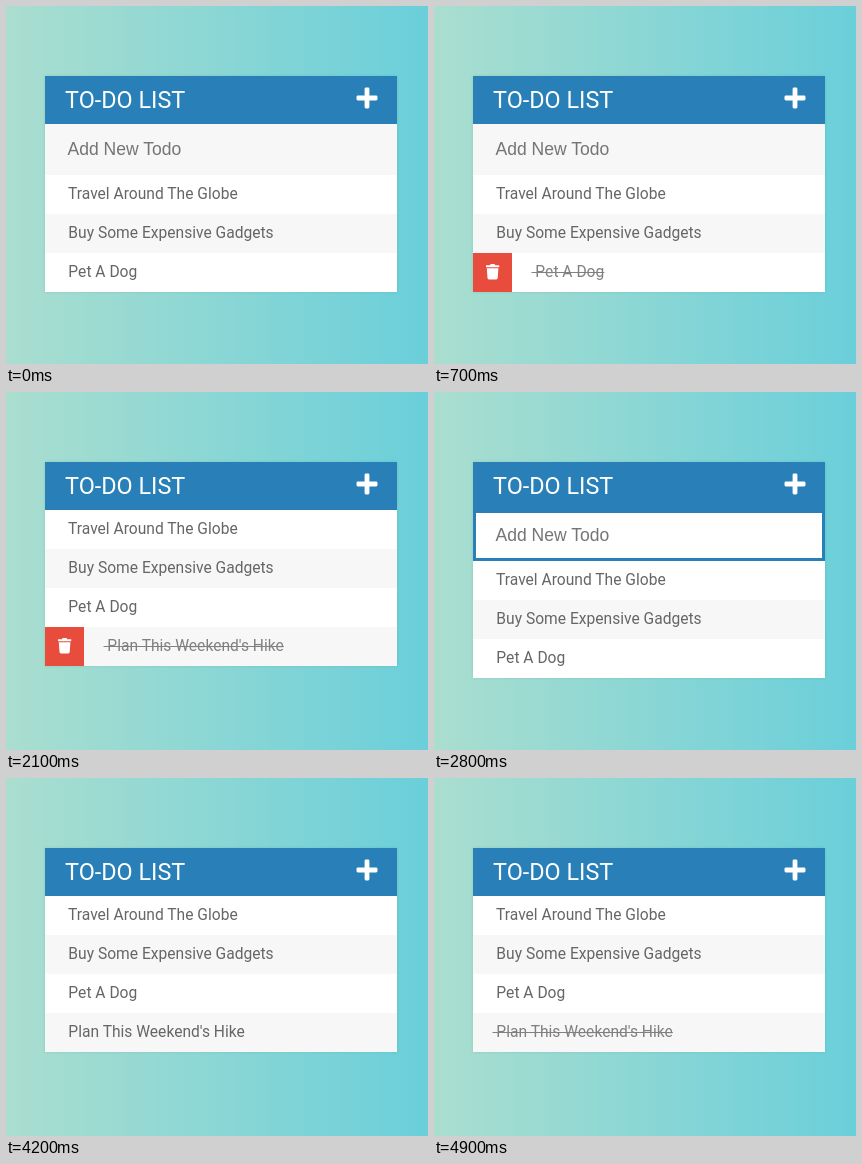
Write an HTML page that moves like this. It is 422 px wide and 358 px high and loops after 5600 ms.

```html
<!DOCTYPE html>
<html lang="en">
<head>
<meta charset="utf-8">
<title>To-Do List</title>
<style>
  html, body { margin: 0; width: 100%; height: 100%; overflow: hidden; }
  body {
    position: relative;
    background: linear-gradient(to right, #aadecf, #6acfda);
    font-family: Roboto, sans-serif;
  }
  .card {
    position: absolute; left: 39px; top: 70px; width: 352px;
    background: #f7f7f7;
    box-shadow: 0 0 3px rgba(0, 0, 0, .1);
  }
  h1 {
    margin: 0; padding-left: 20px; height: 48px;
    font: 400 23.4px/48px Roboto, sans-serif;
    color: #fff; background: #2980b9;
  }
  .plus { position: absolute; left: 311px; top: 11px; }
  .entry {
    box-sizing: border-box; height: 51px; padding-left: 19.5px;
    border: 3px solid transparent;
    font: 17.55px/45px "Liberation Sans", Arial, sans-serif;
    color: #757575; white-space: pre;
  }
  .entry.focus { background: #fff; border-color: #2980b9; }
  .entry.typed { color: #2980b9; }
  ul { margin: 0; padding: 0; list-style: none; }
  li {
    display: flex; height: 39px;
    font-size: 15.6px; line-height: 39px;
    color: #666; background: #fff; white-space: pre;
  }
  li:nth-child(even) { background: #f7f7f7; }
  li span { margin-left: 19.5px; }
  li.done span { color: #808080; text-decoration: line-through; }
  .trash { display: none; width: 39px; height: 39px; background: #e74c3c; }
  li.hover .trash { display: block; }
  [hidden] { display: none; }
</style>
</head>
<body>
<div class="card">
  <h1>TO-DO LIST</h1>
  <svg class="plus" width="22" height="22" fill="#fff">
    <rect x="8.6" y="0.5" width="4.8" height="21" rx="1.4"/>
    <rect x="0.5" y="8.6" width="21" height="4.8" rx="1.4"/>
  </svg>
  <div class="entry"></div>
  <ul></ul>
</div>
<script>
const STEP = 700;
const TASKS = ["Travel Around The Globe", "Buy Some Expensive Gadgets", "Pet A Dog", "Plan This Weekend's Hike"];
const TRASH = `<svg class="trash" viewBox="0 0 39 39" fill="#fff">
  <path d="M13 12.3h4l.7-1.3h3.8l.7 1.3h4v2H13z"/>
  <path d="M13.8 15.3h11.6l-.7 9.8q-.1 1.4-1.5 1.4h-7.2q-1.4 0-1.5-1.4z"/>
</svg>`;

// entry: hidden when absent; last: classes of the final task
const STATES = [
  { count: 3, entry: "idle" },
  { count: 3, entry: "idle", last: "done hover" },
  { count: 2, entry: "idle" },
  { count: 4, last: "done hover" },
  { count: 3, entry: "focus" },
  { count: 3, entry: "focus typed" },
  { count: 4 },
  { count: 4, last: "done" }
];

const entry = document.querySelector(".entry");
const list = document.querySelector("ul");
list.innerHTML = TASKS.map(t => `<li>${TRASH}<span> ${t}</span></li>`).join("");
const rows = [...list.children];

function render({ count, entry: mode, last = "" }) {
  entry.hidden = !mode;
  entry.className = `entry ${mode || ""}`;
  entry.textContent = entry.classList.contains("typed") ? TASKS[3] : "Add New Todo";
  rows.forEach((row, i) => {
    row.hidden = i >= count;
    row.className = i === count - 1 ? last : "";
  });
}

let shown = -1;
const start = performance.now();
function tick() {
  const i = Math.floor((performance.now() - start) / STEP) % STATES.length;
  if (i !== shown) render(STATES[shown = i]);
  requestAnimationFrame(tick);
}
tick();
</script>
</body>
</html>
```
